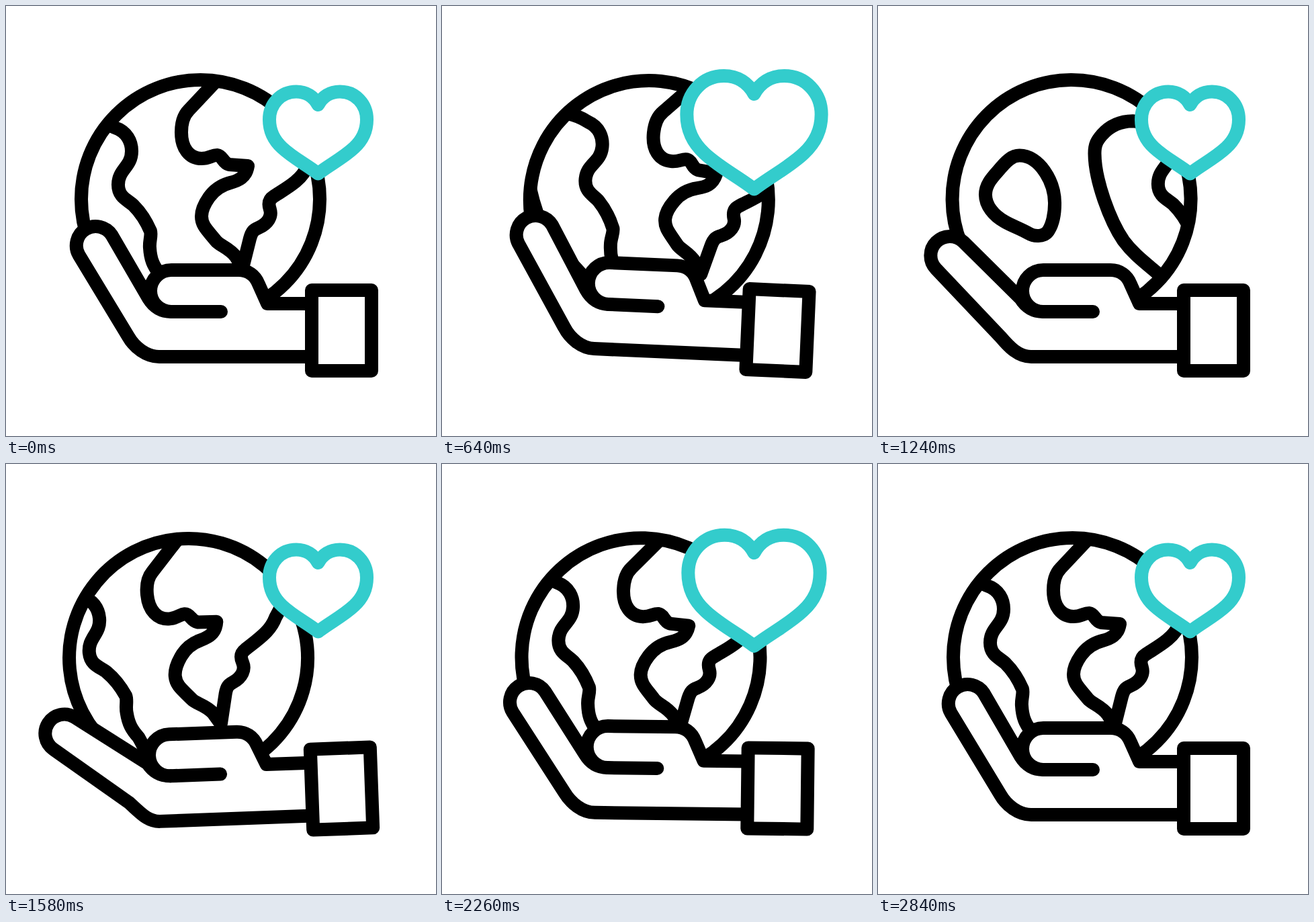
An HTML page that plays this animation: 640x640 px, repeating every 3020 ms.

```html
<!DOCTYPE html>
<html lang="en">
<head>
<meta charset="utf-8">
<title>Caring for the globe</title>
<style>
  html, body { margin: 0; width: 100%; height: 100%; overflow: hidden; background: #fff; }
  svg { display: block; width: 100vw; height: 100vh; }
  path, circle, rect { fill: #fff; stroke: #000; stroke-width: 20; stroke-linejoin: round; stroke-linecap: round; }
  #world path, #outline { fill: none; }
  #heart { stroke: #33cccc; vector-effect: non-scaling-stroke; }
</style>
</head>
<body>
<svg viewBox="0 0 640 640">
  <defs>
    <clipPath id="disc"><circle cx="289.5" cy="287.5" r="180"/></clipPath>
    <g id="world">
      <!-- western land -->
      <path d="M130 172C145 173 154 177 162 181C180 187 187 202 187 216C187 240 167 243 167 266
        C167 285 182 289 190 297C201 308 209 321 215 335C217 342 213 350 214 360C215 377 219 386 228 398
        C234 412 240 425 236 432C210 436 190 422 170 403C150 385 131 372 115 350C95 320 73 260 73 220
        C73 206 77 200 84 192C96 179 112 172 130 172Z"/>
      <!-- central land -->
      <path d="M320 104L272 155C264 163 261 176 261 188C261 212 273 227 291 227C303 227 306 222 314 222
        C323 223 322 233 332 236L360 238C357 256 345 260 334 263C318 267 309 275 302 285
        C295 295 291 303 291 313C291 327 300 334 312 349C318 357 331 359 342 373L352 390L363 346
        C366 335 369 333 376 330C390 324 396 313 393 303C390 294 391 288 399 283C417 271 438 261 448 240
        C466 214 480 190 476 160C470 130 445 100 420 80Z"/>
      <!-- island -->
      <path transform="translate(347)" d="M211 222C240 222 263 260 263 293C263 310 259 325 254 333
        C248 344 232 343 224 338C212 331 200 327 188 320C172 311 160 296 160 280
        C160 262 175 250 184 239C192 230 200 222 211 222Z"/>
    </g>
  </defs>

  <g id="globe">
    <g clip-path="url(#disc)">
      <g id="lands"><use href="#world"/><use href="#world" x="597"/></g>
    </g>
    <circle id="outline" cx="289.5" cy="287.5" r="177.5"/>
  </g>

  <g id="hand">
    <path id="palm"/>
    <path d="M246 455H320"/>
    <rect x="455" y="423" width="89" height="120"/>
  </g>

  <path id="heart" d="M464.5 147C458 135 447 127.5 432 127.5C409 127.5 392 146 392 169
    C392 187 399 200 411 211C427 226 447 236 464.5 249.5C482 236 502 226 518 211
    C530 200 537 187 537 169C537 146 520 127.5 497 127.5C482 127.5 471 135 464.5 147Z"/>
</svg>

<script>
const LOOP = 3020, END = 2840, STEP = 20;
const $ = id => document.getElementById(id);

// Keyframes are [time, value] pairs, eased in and out between each pair.
const tracks = {
  tilt:  [[0, 0], [800, 2.8], [1600, -2.1], [2430, 1], [END, 0]],
  slide: [[0, 0], [800, 21], [1600, -18], [2430, 9.5], [END, 0]],
  spin:  [[0, 0], [800, 28], [1600, -622], [2430, -595], [END, -597]],
  bend:  [[0, 0], [800, 0], [1600, 23.8], [2430, 0], [END, 0]],
  pulse: [[0, 1], [600, 1.405], [920, .853], [1240, 1], [1600, 1],
          [2200, 1.405], [2520, .853], [END, 1]]
};

function valueAt(track, t) {
  const i = track.findIndex(key => key[0] >= t);
  if (i < 1) return track[0][1];
  const [t0, v0] = track[i - 1], [t1, v1] = track[i];
  const x = (t - t0) / (t1 - t0);
  return v0 + (v1 - v0) * x * x * (3 - 2 * x);
}

// Palm outline with the fingers swung outward by an angle in degrees.
function palmPath(bend) {
  const a = bend * Math.PI / 180, c = Math.cos(a), s = Math.sin(a);
  const swing = (x, y) => {
    const dx = x - 182, dy = y - 474;
    return `${182 + dx * c + dy * s} ${474 - dx * s + dy * c}`;
  };
  return `M455 522H228C209 522 ${191 + bend / 3} 508 182 492L${swing(108.6, 370.8)}
    A28.6 28.6 0 0 1 ${swing(157.4, 341)}L212 435C220 448 232 455 246 455
    A31 31 0 0 1 246 393H346C360 393 371 401 376 414L389 443H455`;
}

function draw(t) {
  const { tilt, slide, spin, bend, pulse } =
    Object.fromEntries(Object.entries(tracks).map(([name, track]) => [name, valueAt(track, t)]));
  const roll = slide / 187.5 * 180 / Math.PI;
  $('globe').setAttribute('transform',
    `translate(${slide} ${slide * slide / 330}) rotate(${roll} 289.5 287.5)`);
  $('lands').setAttribute('transform', `translate(${spin})`);
  $('hand').setAttribute('transform', `rotate(${tilt} 499.5 483)`);
  $('palm').setAttribute('d', palmPath(bend));
  $('heart').setAttribute('transform',
    `translate(464.5 189) scale(${pulse}) translate(-464.5 -189)`);
}

function tick() {
  const t = performance.now() % LOOP;
  draw(Math.min(Math.floor(t / STEP) * STEP, END));
  requestAnimationFrame(tick);
}
tick();
</script>
</body>
</html>
```
